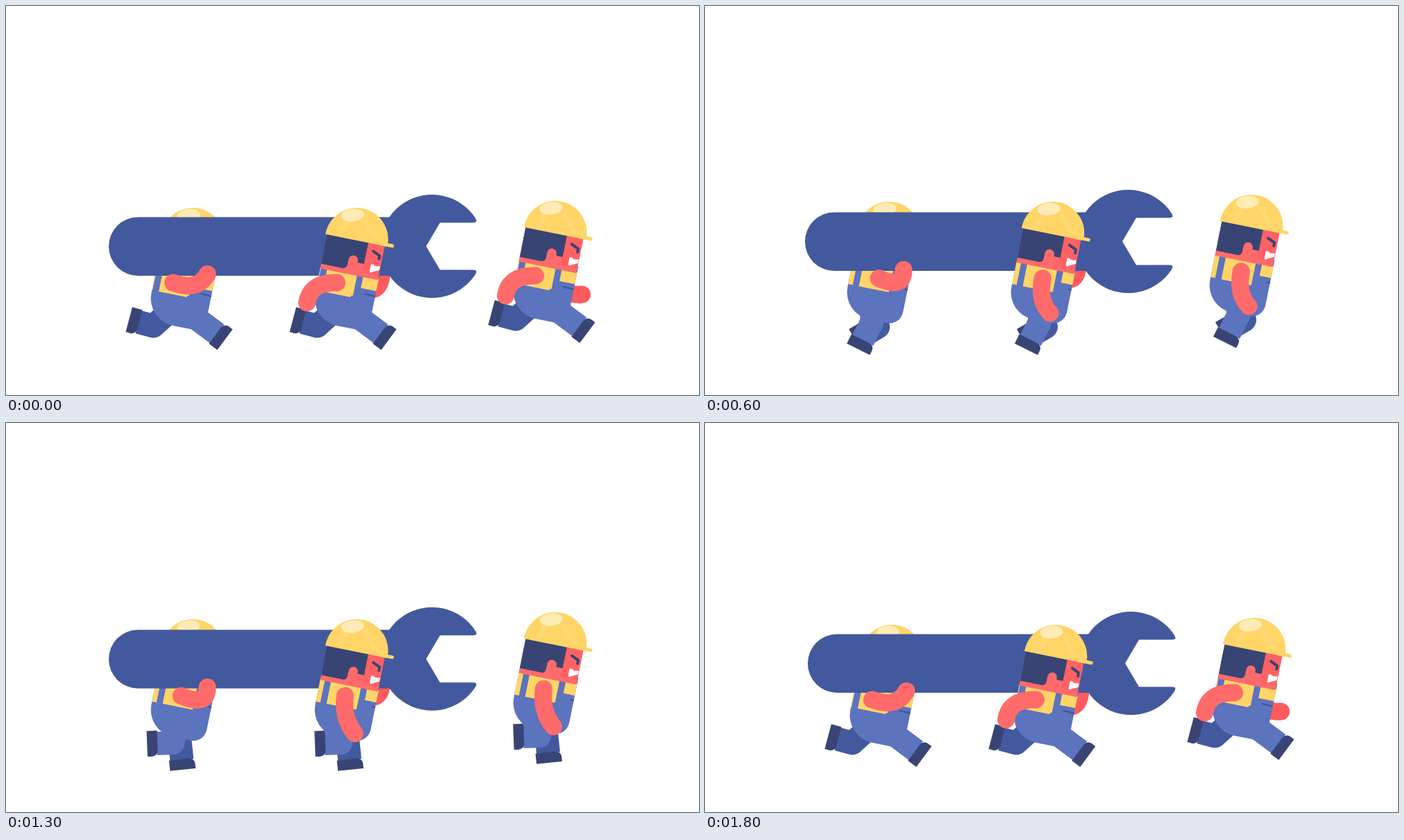
An HTML page with a canvas that plays this animation: 998 px wide and 561 px high, repeating every 1.9 s.

```html
<!DOCTYPE html>
<html lang="en">
<head>
<meta charset="utf-8">
<title>Running crew</title>
<style>
  html, body { margin: 0; width: 100%; height: 100%; overflow: hidden; background: #fff; }
  canvas { display: block; width: 100%; height: 100%; }
</style>
</head>
<body>
<canvas id="stage" width="998" height="561"></canvas>
<script>
const ctx = document.getElementById('stage').getContext('2d');

const STEP = 100, FRAMES = 19, CYCLE = 17, HALF = Math.PI, TILT = 0.2;
const SKIN = '#ff6b6b', FACE = '#ff6265', FAR_SKIN = '#ff5a5d';
const STEEL = '#42599d', DENIM = '#5c73be', NAVY = '#384574';
const YELLOW = '#ffd568', SHINE = '#ffebb5', STRIPE = '#ffd972';

// mean + c1 cos a + s1 sin a + c2 cos 2a + s2 sin 2a + ...
function wave(a, mean, ...terms) {
  return terms.reduce((sum, k, i) => {
    const n = (i >> 1) + 1;
    return sum + k * (i % 2 ? Math.sin(n * a) : Math.cos(n * a));
  }, mean);
}

// Rise of the run, twice per stride.
const lift = (a, h) => wave(2 * a, h / 2 + 0.3, -h / 2, -0.7, -0.3);

// Limb joints are relative to the rear corner of the helmet.
const legPose = a => ({
  kx: wave(a, 25, 28.7, 0, -4.2, -3.5, 1.8),
  ky: wave(a, 133, -4.3, -4.6, -4.8, -4.4),
  ax: wave(a, 19, 51.2, 8, 4.4, 3.2, 3.5, -1.4),
  ay: wave(a, 146.4, 10.2, 6.9, -11.1, -5.1, -1.7, -1.8)
});

const armPose = a => [
  wave(a, 26.5, -10, 1), wave(a, 72, -2),
  wave(a, 14, -36, 2, 0, 0, 0, 3), wave(a, 93, -16, 0, -8),
  wave(a, 27, -53.5, 2, 0, -1.5, 0, 5), wave(a, 113, 0, 0, -14, 4)
];

function at(x, y, draw, angle = 0) {
  ctx.save();
  ctx.translate(x, y);
  ctx.rotate(angle);
  draw();
  ctx.restore();
}

function box(color, x, y, w, h, radii = 0) {
  ctx.fillStyle = color;
  ctx.beginPath();
  ctx.roundRect(x, y, w, h, radii);
  ctx.fill();
}

function poly(color, ...pts) {
  ctx.fillStyle = color;
  ctx.beginPath();
  for (let i = 0; i < pts.length; i += 2) ctx.lineTo(pts[i], pts[i + 1]);
  ctx.closePath();
  ctx.fill();
}

function line(color, width, cap, ...pts) {
  ctx.strokeStyle = color;
  ctx.lineWidth = width;
  ctx.lineCap = cap;
  ctx.lineJoin = 'round';
  ctx.beginPath();
  for (let i = 0; i < pts.length; i += 2) ctx.lineTo(pts[i], pts[i + 1]);
  ctx.stroke();
}

function arm(color, sx, sy, bx, by, hx, hy) {
  ctx.strokeStyle = color;
  ctx.lineWidth = 25;
  ctx.lineCap = 'round';
  ctx.beginPath();
  ctx.moveTo(sx, sy);
  ctx.quadraticCurveTo(bx, by, hx, hy);
  ctx.stroke();
}

function leg(color, a, shift) {
  const { kx, ky, ax, ay } = legPose(a);
  at(shift, 0, () => {
    line(color, 34, 'butt', 25, 101, kx, ky, ax, ay);
    at(ax, ay, () => box(NAVY, -1, -18.5, 15, 37, [8, 0, 0, 0]),
      Math.atan2(ay - ky, ax - kx));
  });
}

function torso(slide) {
  ctx.save();
  ctx.beginPath();
  ctx.roundRect(2.5, 40, 85.5, 86, [0, 0, 20, 40]);
  ctx.clip();
  box(DENIM, 0, 40, 90, 90);
  box(YELLOW, 0, 48, Math.max(0, slide - 9), 34);
  box(YELLOW, slide, 48, 44, 34);
  box(YELLOW, slide + 53, 48, 40, 18);
  line(STEEL, 2.5, 'round', 48 + 2 * slide, 73, 95, 74);
  ctx.restore();
}

function head() {
  box(SKIN, 2.5, -1, 84.5, 51);
  box(FACE, 62, -1, 25, 44);
  box(NAVY, 2.5, -1, 60.5, 32);
  box(NAVY, 2.5, -1, 37.5, 44, [0, 0, 6, 0]);
  box(SKIN, 40, 22, 13.5, 24, [6.7, 6.7, 0, 0]);
  line(NAVY, 4, 'round', 72.5, 10.5, 82.5, 15, 82.8, 20);
  poly('#fff', 73, 29.5, 76, 29, 80, 31, 86.5, 30, 86.5, 35.5, 79, 39, 75, 41.5, 73, 40.5);
}

function helmet() {
  ctx.fillStyle = YELLOW;
  ctx.beginPath();
  ctx.arc(45.5, -1.5, 45.5, Math.PI, 0);
  ctx.lineTo(91, 0);
  ctx.lineTo(0, 0);
  ctx.fill();
  box(YELLOW, 80, -5, 20, 5, [0, 2, 2, 0]);
  poly(STRIPE, 47, -31, 56, -32, 78, -7, 68, -7);
  poly(STRIPE, 24, -28, 32, -29, 24, -4, 16, -4);
  at(33, -34.5, () => {
    ctx.fillStyle = SHINE;
    ctx.beginPath();
    ctx.ellipse(0, 0, 16.5, 9, 0, 0, Math.PI * 2);
    ctx.fill();
  }, -TILT - 0.1);
}

function body(a, swing, shift) {
  leg(STEEL, a + HALF, shift - 2);
  at(0, 0, () => { torso(12.5 + 9 * swing); head(); helmet(); }, TILT);
  leg(DENIM, a, shift + 2);
}

function wrench() {
  const cx = 613.5, cy = 346.5, jaw = 34, edge = 0.575;
  box(STEEL, 148, 304.5, 430, 84.5, [42, 0, 0, 42]);
  ctx.fillStyle = STEEL;
  ctx.beginPath();
  ctx.moveTo(605, cy);
  ctx.lineTo(625, cy - jaw);
  ctx.lineTo(673, cy - jaw);
  ctx.quadraticCurveTo(680, cy - jaw, 676, cy - 40.5);
  ctx.arc(cx, cy, 74.5, -edge, edge, true);
  ctx.quadraticCurveTo(680, cy + jaw, 673, cy + jaw);
  ctx.lineTo(625, cy + jaw);
  ctx.closePath();
  ctx.fill();
}

function scene(frame) {
  // One pose is held for two steps, then the crew jolts back for one.
  const a = (frame < 5 ? frame : frame - 1) / CYCLE * Math.PI * 2;
  const jolt = frame === 6 ? -4 : 0;
  const swing = (1 - Math.cos(a)) / 2;
  const near = armPose(a);
  const runner = (x, y, draw) => at(x + jolt, y - lift(a, 9), draw);

  ctx.fillStyle = '#fff';
  ctx.fillRect(0, 0, 998, 561);

  runner(224, 329, () => body(a, swing, -9 * swing));
  runner(460, 329, () =>
    arm(FAR_SKIN, 65, 80 - 8 * swing, 80, 80 - 8 * swing, 81, 56));
  at(jolt, -lift(a, 7), wrench);
  runner(224, 329, () =>
    arm(SKIN, near[0], near[1], 52 + 22 * swing, 83 + 10 * swing, 66, 57.5 + 4 * swing));
  runner(460, 329, () => {
    body(a, swing, 0);
    arm(SKIN, ...near);
  });
  runner(746, 319, () => {
    at(3, -2, () => arm(FAR_SKIN, ...armPose(a + HALF)));
    body(a, swing, 0);
    arm(SKIN, ...near);
  });
}

const start = performance.now();
function tick() {
  scene(Math.floor((performance.now() - start) / STEP) % FRAMES);
  requestAnimationFrame(tick);
}
tick();
</script>
</body>
</html>
```
